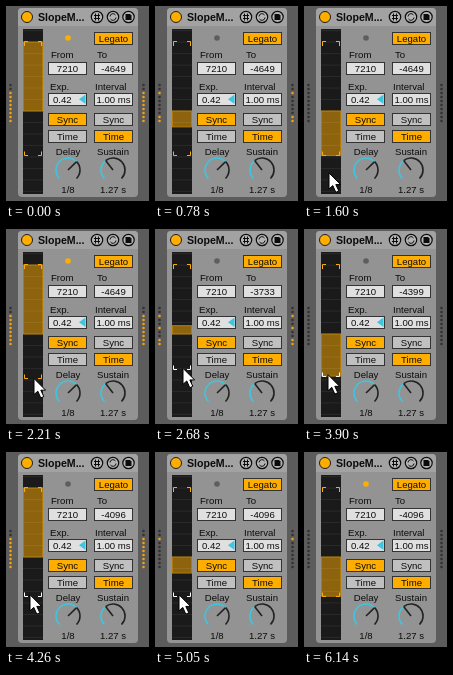
Recreate the animation shown at these times as an HTML page. Size 143 by 195 pixels, loop 6170 ms.

```html
<!DOCTYPE html>
<html lang="en">
<head>
<meta charset="utf-8">
<title>Pitch envelope device</title>
<style>
  html, body { margin: 0; width: 100%; height: 100%; overflow: hidden; background: #5c5c5c; }
  svg { display: block; width: 100vw; height: 100vh; }
  text { font: 9.6px "Liberation Sans", Arial, sans-serif; fill: #0c0c0c; }
  .mid { text-anchor: middle; }
  .title { font-size: 10.6px; font-weight: 700; }
  .box { stroke: #333; }
  .num { fill: #e0e0e0; }
  .off { fill: #c0c0c0; }
  .on { fill: #ffae00; }
  .dial { fill: none; stroke: #222; stroke-width: 1.6; }
  .icon { fill: none; stroke: #0c0c0c; }
  .mark { fill: none; stroke: #ffae00; }
</style>
</head>
<body>
<svg viewBox="0 0 143 195">
  <rect x="12" y="2" width="120" height="189" rx="4" fill="#939393"/>
  <path d="M12 20V6a4 4 0 0 1 4-4H128a4 4 0 0 1 4 4V20Z" fill="#a2a2a2"/>
  <circle cx="21" cy="11" r="5.5" fill="#ffae00" stroke="#1e1e1e"/>
  <text class="title" x="32" y="15">SlopeM...</text>

  <g fill="#b4b4b4" stroke="#0c0c0c" stroke-width="1.2">
    <circle cx="91" cy="11" r="5.7"/><circle cx="107" cy="11" r="5.7"/><circle cx="122.5" cy="11" r="5.7"/>
  </g>
  <path class="icon" d="M89.5 7.5V14.5M92.5 7.5V14.5M88 9.5H94M88 12.5H94M104 10.5a3 3 0 0 1 5.5-1.5M110 11.5a3 3 0 0 1-5.5 1.5"/>
  <path d="M119.5 8H124L125.5 9.5V14H119.5Z" fill="#0c0c0c"/>

  <rect x="17" y="23" width="20" height="165" fill="#1a1a1a"/>
  <rect id="bar" x="17.5" width="19" fill="#ffae00" fill-opacity=".5" stroke="#b27a06"/>
  <g id="grid" stroke="#fff" stroke-opacity=".1" stroke-width=".7"></g>
  <path class="mark" d="M18.5 40V35.5H22M32 35.5H35.5V40"/>
  <path class="mark" id="end" d="M18.5-4V0H22M32 0H35.5V-4"/>

  <circle id="led" cx="62" cy="32" r="2.8"/>
  <g id="panel"></g>
  <path d="M79.5 88.5V98L73 93.2Z" fill="#3ec5e0"/>
  <g id="meters"></g>
  <path id="cursor" d="M0 0V16L3.8 12.6L6.8 19.4L9.8 18L6.8 11.6H11.6Z" fill="#fff" stroke="#000"/>
</svg>
<script>
const LOOP = 6170, HOLD = 145, SWEEP = 1270, FROM = 7210, CURVE = .42;
const TRIGGERS = [0, 2190, 4190], FLASHES = [0, 2190, 4190, 4730, LOOP];
const $ = id => document.getElementById(id);
const add = (id, markup) => $(id).insertAdjacentHTML('beforeend', markup);
const pitchY = cents => 105 - cents * .00957;

// Linear interpolation through [time, value] points
function track(points, t) {
  const i = points.findIndex(p => p[0] > t);
  if (i < 0) return points.at(-1)[1];
  if (!i) return points[0][1];
  const [t0, a] = points[i - 1], [t1, b] = points[i];
  return a + (b - a) * (t - t0) / (t1 - t0);
}

const label = (x, y, s, cls = '') => `<text class="${cls}" x="${x}" y="${y}">${s}</text>`;
function box(x, y, s, kind, id = '') {
  add('panel', `<rect class="box ${kind}" x="${x + .5}" y="${y + .5}" width="38" height="12"/>
    <text class="mid" id="${id}" x="${x + 19.5}" y="${y + 9.8}">${s}</text>`);
}
function knob(x, name, value, turn) {
  const y = 164;
  const at = (f, r = 12) => {
    const a = (135 + 270 * f) * Math.PI / 180;
    return `${x + r * Math.cos(a)} ${y + r * Math.sin(a)}`;
  };
  const arc = (a, b) => `M${at(a)}A12 12 0 ${b - a > 2 / 3 ? 1 : 0} 1 ${at(b)}`;
  add('panel', label(x, 149, name, 'mid') + label(x, 187, value, 'mid') +
    `<path class="dial" d="${arc(turn, 1)}"/>
     <path class="dial" style="stroke:#3ec5e0" d="${arc(0, turn)}"/>
     <path class="dial" d="M${x} ${y}L${at(turn)}"/>`);
}

for (let c = -8400; c <= 8400; c += 1200) add('grid', `<path d="M17 ${pitchY(c)}H37"/>`);
add('panel', label(45, 52, 'From') + label(91, 52, 'To') +
  label(44, 84, 'Exp.') + label(89, 84, 'Interval'));
box(88, 26, 'Legato', 'on');
box(42, 56, '7210', 'num');
box(88, 56, '', 'num', 'to');
box(42, 87, '', 'num');
add('panel', label(47, 96.8, '0.42'));
box(88, 87, '1.00 ms', 'num');
box(42, 107, 'Sync', 'on');
box(88, 107, 'Sync', 'off');
box(42, 124, 'Time', 'off');
box(88, 124, 'Time', 'on');
knob(62, 'Delay', '1/8', .67);
knob(107, 'Sustain', '1.27 s', .36);

// How long each meter dot stays lit after a note, top to bottom
const DOT_LIFE = [0, 0, 1550, 200, 200, 600, 200, 200, 850, 850];
DOT_LIFE.forEach((life, row) => {
  for (const x of [4.5, 137.5])
    add('meters', `<circle cx="${x}" cy="${79 + row * 4}" r="1.3" data-life="${life}"/>`);
});
const dots = [...$('meters').children];

const toPitch = [[2480, -4649], [2650, -3733], [2710, -3733], [2860, -3560], [3120, -4380], [3260, -4420],
  [3430, -3941], [3480, -3941], [3700, -3990], [3900, -4400], [4060, -4230], [4220, -4096]];
const cursorX = [[1400, 24], [1600, 25], [2000, 28], [2700, 28], [3300, 24], [5100, 24], [5500, 22]];
const enter = [[1280, 197], [1500, 171], [1600, 167], [1900, 154], [2250, 149], [2480, 148]];
const leave = [[5070, 143], [5250, 155], [5600, 197]];

function draw(t) {
  const to = Math.round(track(toPitch, t));
  const age = t - TRIGGERS.findLast(s => s <= t);
  const p = Math.min(1, Math.max(0, (age - HOLD) / SWEEP)) ** CURVE;
  const y = pitchY(FROM + (to - FROM) * p), zero = pitchY(0);
  $('bar').setAttribute('y', Math.min(y, zero));
  $('bar').setAttribute('height', Math.max(1, Math.abs(y - zero)));

  $('to').textContent = to;
  $('end').setAttribute('transform', `translate(0 ${Math.floor(pitchY(to)) + .5})`);
  $('end').style.stroke = t > 2300 && t < 5120 ? '#fff' : '';
  $('led').setAttribute('fill', FLASHES.some(f => t >= f - 30 && t < f + 55) ? '#ffae00' : '#5e5e5e');
  for (const d of dots) d.setAttribute('fill', age < d.dataset.life ? '#f0a010' : '#333');

  const tip = t < 2480 ? track(enter, t) : t < 5070 ? pitchY(to) - 1.4 : track(leave, t);
  $('cursor').setAttribute('transform', `translate(${track(cursorX, t)} ${tip})`);
}

const start = performance.now();
function frame() {
  draw((performance.now() - start) % LOOP);
  requestAnimationFrame(frame);
}
frame();
</script>
</body>
</html>
```
